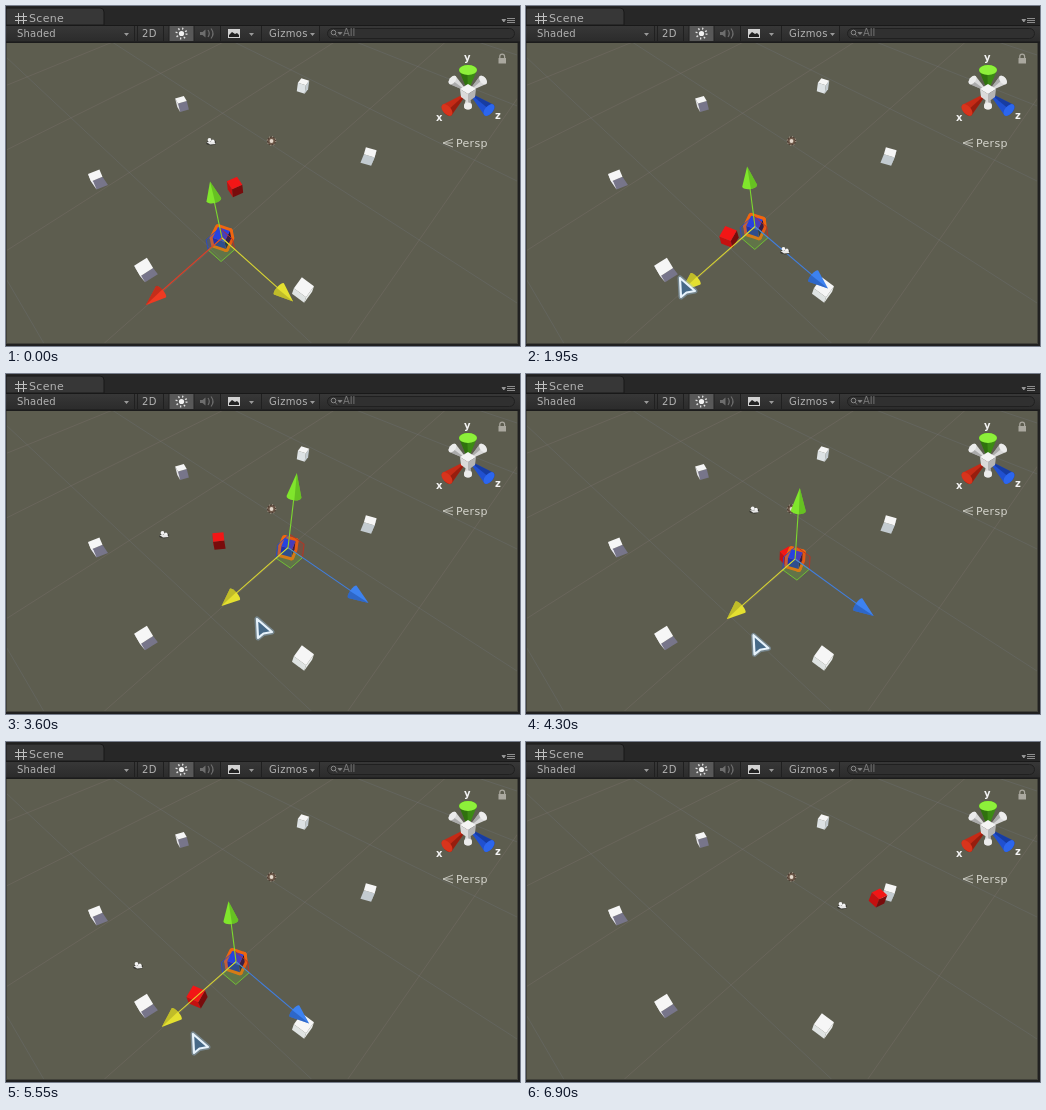
An HTML page that plays this animation: 514 px wide and 340 px high, repeating every 6950 ms.

```html
<!DOCTYPE html>
<html lang="en">
<head>
<meta charset="utf-8">
<title>Scene view</title>
<style>
html, body { margin: 0; width: 100%; height: 100%; overflow: hidden; background: #202020; }
svg { display: block; width: 514px; height: 340px; }
text { font-family: "DejaVu Sans", Verdana, sans-serif; font-size: 10px; fill: #b2b2b2; }
</style>
</head>
<body>
<svg viewBox="0 0 514 340" width="514" height="340">
  <defs>
    <clipPath id="view"><rect x="1" y="37" width="510" height="300"/></clipPath>
    <linearGradient id="bar" x2="0" y2="1"><stop stop-color="#383838"/><stop offset="1" stop-color="#2b2b2b"/></linearGradient>
  </defs>
  <rect width="514" height="340" fill="#202020"/>
  <!-- tab -->
  <rect width="514" height="19" fill="#272727"/>
  <path d="M0 19V2H94Q98 2 98 6V19Z" fill="#373737" stroke="#191919"/>
  <path d="M12.5 7V18M17.5 7V18M9 10.5H21M9 14.5H21" stroke="#c0c0c0" fill="none"/>
  <text x="23" y="16" style="font-size:11px" letter-spacing=".3">Scene</text>
  <path d="M496 13.5h3.500l-1.700 2.500zM501 12.500h8M501 14.500h8M501 16.500h8" stroke="#999" fill="#999" stroke-width=".9"/>
  <!-- toolbar -->
  <rect y="19" width="514" height="17" fill="url(#bar)"/>
  <path d="M0 19.500H514M0 36H514" stroke="#191919"/>
  <rect x="163" y="20" width="25" height="15" fill="#585858"/>
  <path d="M128.500 20V35M131.500 20V35M157.500 20V35M163 20V35M188 20V35M214.500 20V35M255.500 20V35M313.500 20V35" stroke="#202020"/>
  <text x="11" y="31" letter-spacing=".2">Shaded</text>
  <text x="136" y="31" letter-spacing=".5">2D</text>
  <text x="263" y="31" letter-spacing=".3">Gizmos</text>
  <path d="M118 27h5l-2.500 3zM243 27h5l-2.500 3zM304 27h5l-2.500 3z" fill="#999"/>
  <circle cx="175.500" cy="27.500" r="2.600" fill="#f2f2f2"/>
  <circle cx="175.500" cy="27.500" r="5" fill="none" stroke="#e4e4e4" stroke-width="2" stroke-dasharray="1.300 2.627"/>
  <path d="M194 26h2.500l3-2.500v8l-3-2.500H194z" fill="#6d6d6d"/>
  <path d="M202 24q2.500 3.500 0 7M205 22.500q4 5 0 10" fill="none" stroke="#6d6d6d" stroke-width="1.200"/>
  <rect x="222" y="23" width="12" height="9" fill="#d2d2d2"/>
  <path d="M223 31v-2l3-3 3 2 2-1 2 2v2z" fill="#222"/>
  <rect x="321.500" y="22.500" width="187" height="10" rx="5" fill="#303030" stroke="#202020"/>
  <circle cx="327.500" cy="26.500" r="2.300" fill="none" stroke="#888"/>
  <path d="M329 28l2 2.500M332 26.500h4l-2 2z" stroke="#888" stroke-width=".8" fill="#888"/>
  <text x="337" y="30" style="fill:#777">All</text>
  <!-- view -->
  <rect y="37" width="512" height="301" fill="#42423a"/>
  <rect x="1" y="37" width="510" height="300" fill="#5d5d4f"/>
  <g clip-path="url(#view)">
    <g id="still"></g>
    <g id="moving"></g>
    <g id="compass"></g>
  </g>
  <g id="cursor">
    <path d="M0 0L1 19L6.500 14.500L15 13Z" fill="none" stroke="#9ac4e8" stroke-width="5" stroke-linejoin="round" opacity=".4"/>
    <path d="M0 0L1 19L6.500 14.500L15 13Z" fill="#466987" stroke="#e6f2fb" stroke-width="2.200" stroke-linejoin="round"/>
  </g>
</svg>
<script>
const LOOP = 6950, STEP = 50;
const $ = id => document.getElementById(id);

// vanishing points of the world axes
const VX = [725, -216], VY = [254, 411], VZ = [-285, -216];
const lerp = (p, q, k) => [p[0] + (q[0] - p[0]) * k, p[1] + (q[1] - p[1]) * k];
const add = (p, ...vs) => vs.reduce((s, [v, k]) => [s[0] + v[0] * k, s[1] + v[1] * k], p);
const toward = (p, v, k) => [(v[0] - p[0]) * k, (v[1] - p[1]) * k];
const fix = p => p[0].toFixed(2) + ' ' + p[1].toFixed(2);

// screen vectors of one handle length along x, y and z
const basis = p => ({ x: toward(p, VX, -.15), y: toward(p, VY, -.315), z: toward(p, VZ, -.142) });

const poly = (pts, fill, extra = '') => `<path d="M${pts.map(fix).join('L')}Z" fill="${fill}" ${extra}/>`;
const line = (a, b, color, w = 1, extra = '') =>
  `<path d="M${fix(a)}L${fix(b)}" stroke="${color}" stroke-width="${w}" ${extra}/>`;

function cube(c, yaw, [top, left, right], outline) {
  const { x, y, z } = basis(c), h = .0625 * (c[1] + 216) / 450;
  const dir = a => add([0, 0], [x, Math.cos(a)], [z, Math.sin(a)]);
  const corner = (i, s) => add(c, [dir(yaw + (i + .5) * Math.PI / 2), h * Math.SQRT2], [y, h * s]);
  const faces = [];
  for (let i = 0; i < 4; i++) {
    const n = dir(yaw + (i + 1) * Math.PI / 2);
    if (n[1] > 0) {
      const pts = [corner(i, -1), corner(i + 1, -1), corner(i + 1, 1), corner(i, 1)];
      faces.push([pts, n[0] < 0 ? left : right]);
    }
  }
  faces.push([[0, 1, 2, 3].map(i => corner(i, 1)), top]);
  const edge = outline
    ? faces.map(f => poly(f[0], outline, `stroke="${outline}" stroke-width="6" stroke-linejoin="round"`)).join('') : '';
  return edge + faces.map(f => poly(f[0], f[1])).join('');
}

// cone pointing at tip, with its base disc at the other end
function cone(tip, base, r, flat, light, dark, cap) {
  const dx = tip[0] - base[0], dy = tip[1] - base[1], len = Math.hypot(dx, dy);
  const deg = Math.atan2(dy, dx) * 180 / Math.PI;
  return `<g transform="translate(${fix(base)}) rotate(${deg.toFixed(1)})">
    <path d="M${len} 0L0 ${-r}A${flat} ${r} 0 0 0 0 ${r}Z" fill="${light}"/>
    <path d="M${len} 0L0 ${r}A${flat} ${r} 0 0 1 ${-flat} ${r * .1}Z" fill="${dark}" opacity=".6"/>
    ${cap ? `<ellipse rx="${flat}" ry="${r}" fill="${cap}"/>` : ''}</g>`;
}

const COLORS = {
  x: ['#ee3a22', '#a82416'], y: ['#80e62c', '#55a81c'],
  z: ['#3d82f0', '#2455ae'], on: ['#e4e030', '#a8a424']
};

function handles(p, active) {
  const b = basis(p), f = .18;
  const quad = (u, v, color) => poly([p, add(p, [u, f]), add(p, [u, f], [v, f]), add(p, [v, f])],
    color, `fill-opacity=".22" stroke="${color}" stroke-width="1" stroke-opacity=".9"`);
  let out = quad(b.x, b.y, '#2a4ac8') + quad(b.y, b.z, '#c03020') + quad(b.x, b.z, '#72c832');
  for (const k of 'yxz') {
    const [light, dark] = COLORS[k === active ? 'on' : k];
    const tip = add(p, [b[k], 1]), base = add(p, [b[k], k === 'y' ? .68 : .8]);
    out += line(p, base, light, 1.1, 'opacity=".9"') + cone(tip, base, 7.5, k === 'y' ? 3.5 : 2.5, light, dark);
  }
  return out;
}

const cameraIcon = p => `<g transform="translate(${fix(p)})">
  <path d="M-5 1L-2 -2.500L1 -3L5 -.500L4.500 2.500L0 3.500L-4 2.500Z" fill="#3a3a34"/>
  <circle cx="-1.500" cy="-2" r="1.900" fill="#f4f4f4"/><circle cx="1.800" cy="-.800" r="1.800" fill="#f4f4f4"/>
  <path d="M-4.500 0L3.500 0L4.500 2L-1 2.500Z" fill="#e8e8e8"/></g>`;

function drawStill() {
  const root = [205, 243];
  const onAxis = (v, k) => [(root[0] + k * v[0]) / (1 + k), (root[1] + k * v[1]) / (1 + k)];
  let out = '';
  for (let i = -3; i < 6; i++) {
    const a = onAxis(VX, i * .22), b = onAxis(VZ, i * .2);
    out += line(lerp(VZ, a, .2), lerp(VZ, a, 4), '#8088a0', .8, 'opacity=".22"');
    out += line(lerp(VX, b, .2), lerp(VX, b, 4), '#a08a90', .8, 'opacity=".22"');
  }
  const pale = '#f6f6f6', dusk = '#77758a', mist = '#c3cbd0';
  out += [
    [297, 80, .25, pale, '#dde2e4', mist], [176, 98, -.35, pale, '#e2e2e8', dusk],
    [362.5, 150.5, .35, pale, mist, '#b4bcc4'], [92, 173.5, -.25, pale, '#ececf0', dusk],
    [140, 264, -.15, pale, '#f0f0f2', dusk], [297, 284, .08, pale, '#dfe3e2', '#e9eceb']
  ].map(([x, y, yaw, ...cols]) => cube([x, y], yaw, cols)).join('');
  out += `<circle cx="265.500" cy="135" r="4" fill="#6f5a4a" stroke="#4a3a30"/>
    <circle cx="265.500" cy="135" r="4.300" fill="none" stroke="#c8b8a8" stroke-width="1" stroke-dasharray="1 2.400"/>
    <circle cx="265.500" cy="135" r="1.900" fill="#e4d8cc"/>`;
  $('still').innerHTML = out;
}

function drawCompass() {
  const hub = [462, 86];
  const arm = (x, y, r, flat, c) => cone(hub, [x, y], r, flat, ...c);
  const grey = ['#d8d8d8', '#8e8e8e', '#ececec'];
  const label = (x, y, s) => `<text x="${x}" y="${y}" style="font-weight:bold;fill:#f2f2f2">${s}</text>`;
  $('compass').innerHTML =
    arm(446.5, 74, 5, 3, grey) + arm(477, 74, 5, 3, grey) + arm(462, 100, 4, 3.5, grey) +
    arm(441, 104, 7, 4, ['#c42a16', '#7a160a', '#d8341c']) +
    arm(483, 104, 7, 4, ['#2050d0', '#122f84', '#2c66ee']) +
    arm(462, 64, 9, 5, ['#3c8a14', '#28600c', '#8df03a']) +
    poly([[462, 78], [470, 83], [462, 88], [454, 83]], '#f4f4f4') +
    poly([[454, 83], [462, 88], [462, 96], [455, 91]], '#dadada') +
    poly([[470, 83], [462, 88], [462, 96], [469, 91]], '#b4b4b4') +
    label(430, 115, 'x') + label(458, 55, 'y') + label(489, 113, 'z') +
    `<rect x="492.500" y="52" width="7.500" height="5.500" fill="#aaa89f"/>
     <path d="M493.800 52v-1.500a2.400 2.400 0 0 1 4.800 0v1.500" fill="none" stroke="#aaa89f" stroke-width="1.200"/>
     <path d="M447 133L437 137L447 141M437 137H447" fill="none" stroke="#c4c4bc"/>
     <text x="450" y="141" style="font-size:11px;fill:#d4d4cc" letter-spacing=".3">Persp</text>`;
}

// monotone cubic through keys [time, x, y]
function track(keys, t) {
  const n = keys.length - 1;
  if (t <= keys[0][0]) return keys[0].slice(1);
  if (t >= keys[n][0]) return keys[n].slice(1);
  const i = keys.findIndex(k => k[0] > t) - 1;
  const h = keys[i + 1][0] - keys[i][0], u = (t - keys[i][0]) / h;
  return [1, 2].map(c => {
    const rise = j => (keys[j + 1][c] - keys[j][c]) / (keys[j + 1][0] - keys[j][0]);
    const slope = j => {
      if (j === 0 || j === n) return 0;
      const a = rise(j - 1), b = rise(j);
      return a * b > 0 ? 2 * a * b / (a + b) : 0;
    };
    const p = keys[i][c], q = keys[i + 1][c];
    return p + (q - p) * u * u * (3 - 2 * u) + h * u * (1 - u) * (slope(i) * (1 - u) - slope(i + 1) * u);
  });
}

// the dragged cube slides along one line, so its keys hold x only
const slide = x => [x, 232 - (x - 216) * .884];
const DRAGGED = [[500, 216], [850, 192], [950, 192], [1600, 214], [1950, 229], [2300, 219], [2950, 229],
  [3600, 282], [3950, 282], [4850, 221], [5200, 172], [5550, 230], [5750, 231], [6350, 376]]
  .map(([t, x]) => [t, ...slide(x)]);
const CHASER = [[200, 229, 181], [850, 242, 201], [1300, 246, 226], [1600, 234, 236], [1950, 203, 231],
  [2450, 146, 211], [2950, 127, 190], [3600, 213, 167], [4250, 262, 181], [4850, 246, 206],
  [5550, 191, 255], [5800, 213, 251], [6450, 298, 184], [6900, 352, 156]];
const FOLLOWER = [[200, 205, 136], [850, 217, 153], [1400, 258, 196], [1950, 259, 245], [2450, 160, 242],
  [2950, 68, 195], [3600, 158, 161], [4250, 223, 136], [4850, 280, 161], [5200, 225, 186],
  [5550, 132, 224], [5800, 155, 225], [6450, 260, 190], [6900, 316, 164]];
const POINTER = [[200, 317, 334], [450, 149, 281], [500, 149, 281], [850, 125, 303], [950, 125, 303],
  [1600, 140, 285], [1950, 154, 272], [2300, 145, 281], [2950, 165, 266], [3600, 251, 245],
  [3950, 250, 250], [4850, 159, 290], [5200, 120, 322], [5550, 187, 292], [5750, 195, 270], [6350, 318, 142]];

// yaw that turns the chaser away from its follower
function heading(p, from) {
  const { x, y, z } = basis(p);
  const v = add(p, [from, -1], [y, .15]);
  const det = x[0] * z[1] - z[0] * x[1];
  return Math.atan2((x[0] * v[1] - x[1] * v[0]) / det, (v[0] * z[1] - z[0] * v[1]) / det);
}

function draw(t) {
  const blue = track(DRAGGED, t), red = track(CHASER, t), cam = track(FOLLOWER, t);
  const alive = t < 6450;
  let out = cube(red, heading(red, cam), ['#f21616', '#c41010', '#780c0c']);
  if (alive) {
    out += cube(blue, .4, ['#2740e6', '#1c2ca8', '#141a50'], '#f0660f');
    out += handles(blue, t < 450 ? 'z' : 'x');
  }
  $('moving').innerHTML = out + cameraIcon(cam);
  const cursor = $('cursor');
  cursor.setAttribute('transform', `translate(${fix(track(POINTER, t))})`);
  cursor.setAttribute('visibility', t >= 50 && alive ? 'visible' : 'hidden');
}

drawStill();
drawCompass();
const start = performance.now();
function tick() {
  const t = (performance.now() - start) % LOOP;
  draw(Math.floor(t / STEP) * STEP);
  requestAnimationFrame(tick);
}
tick();
</script>
</body>
</html>
```
